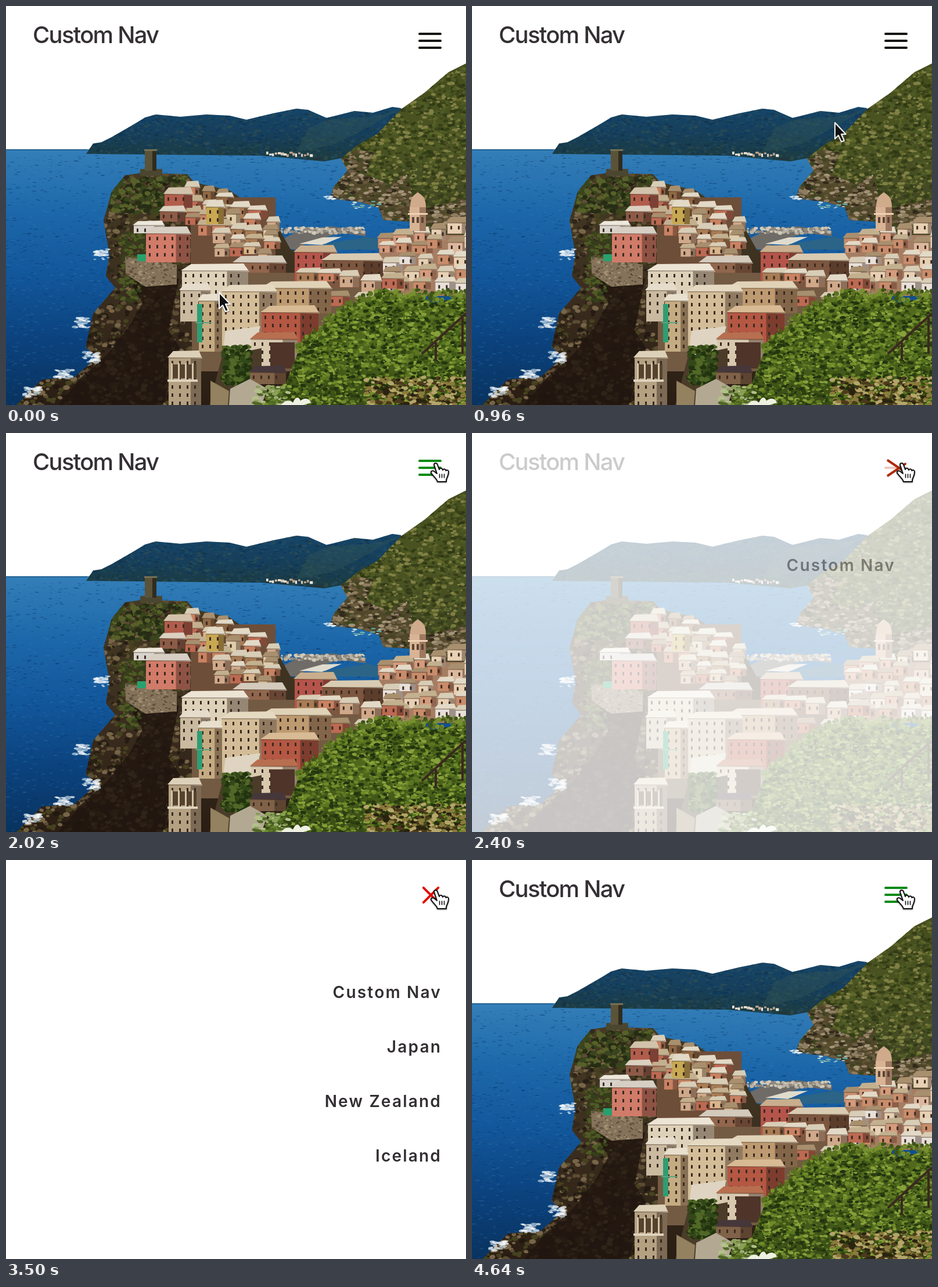
Write an HTML page with a canvas that moves like this. It is 792 px wide and 688 px high and loops after 4.66 s.

```html
<!DOCTYPE html>
<html lang="en">
<head>
<meta charset="utf-8">
<title>Custom Nav</title>
<style>
:root { --loop: 4660ms linear infinite; }
html, body { margin: 0; width: 100%; height: 100%; overflow: hidden; background: #fff; }
body { position: relative; font-family: Inter, "Open Sans", sans-serif; color: #332f33; }
canvas, .menu { position: absolute; left: 0; top: 0; width: 792px; height: 688px; }
h1 { position: absolute; left: 46px; top: 26px; margin: 0; font-size: 40px; line-height: 48px; font-weight: 500; letter-spacing: -1.75px; white-space: nowrap; }

.menu { background: #fff; animation: menu var(--loop); }
.menu span { position: absolute; right: 42px; top: calc(208px + var(--i) * 94px); font-size: 28px; line-height: 40px; font-weight: 600; letter-spacing: 2.2px; white-space: nowrap; animation: slide var(--loop) backwards; animation-delay: calc(var(--i) * 200ms); }
@keyframes menu {
  0%, 48.28% { opacity: 0; }
  52.58%, 81.33% { opacity: 1; }
  85.19%, 100% { opacity: 0; }
}
@keyframes slide {
  0%, 48.28% { opacity: 0; transform: translateX(-50px); animation-timing-function: ease; }
  57.94%, 85.84% { opacity: 1; transform: none; }
  85.85%, 100% { opacity: 0; transform: translateX(-50px); }
}

.bar { position: absolute; left: 710px; width: 40px; height: 4px; border-radius: 2px; animation: tint var(--loop), top var(--loop); }
.bar:nth-child(1) { top: 46px; }
.bar:nth-child(2) { top: 58px; animation-name: tint, middle; }
.bar:nth-child(3) { top: 70px; animation-name: tint, bottom; }
@keyframes tint {
  0%, 25.75% { background: #15140c; }
  28%, 48.28% { background: #088a14; }
  52.58%, 81.33% { background: #e10c00; }
  85.19%, 100% { background: #088a14; }
}
@keyframes top {
  0%, 48.28%, 85.19%, 100% { transform: none; }
  52.58%, 81.33% { transform: translate(1.5px, 12.5px) rotate(45deg); }
}
@keyframes middle {
  0%, 48.28%, 85.19%, 100% { opacity: 1; }
  52.58%, 81.33% { opacity: 0; }
}
@keyframes bottom {
  0%, 48.28%, 85.19%, 100% { transform: none; }
  52.58%, 81.33% { transform: translate(1.5px, -11.5px) rotate(-45deg); }
}

.cursor { position: absolute; left: 0; top: 0; width: 1px; height: 1px; overflow: visible; filter: drop-shadow(0 1px 1px #0007); animation: move var(--loop); }
.arrow { animation: arrow var(--loop); }
.hand { animation: hand var(--loop); }
@keyframes move {
  0%, 6.44% { transform: translate(366px, 493px); animation-timing-function: ease-in; }
  12.88% { transform: translate(384px, 483px); animation-timing-function: cubic-bezier(.45, 0, .25, 1); }
  28.33% { transform: translate(712px, 96px); animation-timing-function: ease-in-out; }
  42%, 100% { transform: translate(740px, 54px); }
}
@keyframes arrow { 0%, 25.74% { opacity: 1; } 25.75%, 100% { opacity: 0; } }
@keyframes hand { 0%, 25.74% { opacity: 0; } 25.75%, 100% { opacity: 1; } }
</style>
</head>
<body>
<canvas width="792" height="688"></canvas>
<h1>Custom Nav</h1>
<nav class="menu">
  <span style="--i:0">Custom Nav</span>
  <span style="--i:1">Japan</span>
  <span style="--i:2">New Zealand</span>
  <span style="--i:3">Iceland</span>
</nav>
<div><i class="bar"></i><i class="bar"></i><i class="bar"></i></div>
<svg class="cursor" stroke-linejoin="round" stroke-linecap="round">
  <path class="arrow" d="M1 1V29L7 23 12 34 17 32 12 21H20Z" fill="#111" stroke="#fff" stroke-width="2"/>
  <g class="hand" stroke="#111" stroke-width="2">
    <path d="M-3 1C-3-3 2-3 3 1L6 9C7 6 11 6 12 10 13 7 17 8 17.5 11 19 9 22 10 22 13 22 20 19 22 18 27V30H3C2 25-4 21-8 15-9 12-6 10-3 12L2 16Z" fill="#fff"/>
    <path d="M6.5 17V23M10.5 17V23M14.5 17V23" stroke-width="1.6"/>
  </g>
</svg>
<script>
const g = document.querySelector('canvas').getContext('2d');

let seed = 7;
const rnd = () => (seed = (seed * 16807) % 2147483647) / 2147483647;
const pick = list => list[Math.floor(rnd() * list.length)];
const range = (a, b) => a + rnd() * (b - a);

function shape(d, color) {
  g.fillStyle = color;
  g.fill(new Path2D(d));
}
function rect(x, y, w, h, color) {
  g.fillStyle = color;
  g.fillRect(x, y, w, h);
}
function fade(y0, y1, ...colors) {
  const f = g.createLinearGradient(0, y0, 0, y1);
  colors.forEach((c, i) => f.addColorStop(i / (colors.length - 1), c));
  return f;
}
// Scatter small dabs inside a path; box is [x, y, w, h].
function speckle(d, box, n, size, flat, colors) {
  const [x, y, w, h] = box;
  g.save();
  g.clip(new Path2D(d));
  for (let i = 0; i < n; i++) {
    const s = range(.4, 1) * size;
    g.fillStyle = pick(colors);
    g.beginPath();
    g.ellipse(x + rnd() * w, y + rnd() * h, s, s * flat, range(-.4, .4) * flat, 0, 7);
    g.fill();
  }
  g.restore();
}
function house(x, y, w, h, wall, roof = pick(['#d8cdb6', '#c3b08f', '#e2d9c6', '#a88f6e'])) {
  const r = Math.min(12, h * .35), tilt = w * .14;
  rect(x, y + r, w, h - r, wall);
  rect(x + w * .68, y + r, w * .32, h - r, '#2b180f66');
  shape(`M${x - 2} ${y + r}L${x + tilt} ${y + 1}L${x + w - tilt / 2} ${y}L${x + w + 2} ${y + r + 2}Z`, roof);
  rect(x - 1, y + r, w + 2, 1.5, '#4a33247a');
  for (let v = y + r + 6; v < y + h - 7; v += 14)
    for (let u = x + 5; u < x + w - 5; u += 13) rect(u, v, 3, 6, '#3b2a22');
}
// Fill a sloped strip with small houses, back row first.
function village(x0, x1, top, bottom, rows, w, walls) {
  for (let r = 0; r < rows; r++) {
    const k = rows > 1 ? r / (rows - 1) : 0;
    for (let x = x0 + rnd() * 12; x < x1; x += range(.75, 1.15) * w) {
      const t = (x - x0) / (x1 - x0);
      house(x, top(t) * (1 - k) + bottom(t) * k + range(-5, 5), range(.7, 1.1) * w, range(20, 32), pick(walls));
    }
  }
}

const sea = 'M0 247H792V688H0Z';
const far = 'M138 255L150 237 164 235 182 226 215 207 240 192 258 187 300 191 345 187 385 189 414 196 460 185 500 177 520 179 552 193 600 181 632 184 665 174 680 176 690 210 600 258 548 268 440 258Z';
const hill = 'M792 99L762 114 720 150 680 178 640 220 605 240 577 263 588 284 564 312 570 328 610 338 642 348 650 369 700 372V400H792Z';
const rocks = 'M577 263L605 248 632 252 620 290 660 308 690 290 700 330 720 350 792 330V400H700V372L650 369 642 348 610 338 557 332 564 312 588 284Z';
const cliff = 'M205 292L232 288 312 290 324 304 385 318 465 374 490 420 640 450 640 688H18L62 644 118 640 156 606 137 588 150 530 188 486 172 466 178 428 168 370 182 320Z';
const shade = 'M205 455L298 470 280 560 300 590 270 688H90L130 640 175 600 215 548 235 512Z';
const bush = 'M440 688L456 664 482 650 500 604 512 578 546 552 570 530 598 512 626 504 652 486 680 500 704 494 735 512 766 506 792 496V688Z';

const walls = ['#c98262', '#d9b58c', '#a97c55', '#bd6a52', '#e0cda8', '#8f6844', '#cfa98a'];

// Water and distant coast
shape(sea, fade(247, 688, '#347fb8', '#1c67a9', '#12569a', '#0b427d', '#09335f'));
speckle(sea, [0, 258, 792, 430], 4200, 4, .2, ['#0b3c7a88', '#3c82b866', '#08305f77', '#1f6bab88']);
rect(0, 247, 140, 1.5, '#195685');
shape(far, fade(176, 262, '#164568', '#163f5b', '#1c3c42'));
speckle(far, [138, 176, 552, 90], 1300, 4, .5, ['#0d365e88', '#38524d77', '#23506a88', '#122c3c66']);
shape('M520 212L552 196 635 190 678 178 600 222 560 240 500 252Z', '#34555566');
for (let x = 448; x < 528; x += 5) rect(x, range(251, 256), range(3, 6), range(3, 6), pick(['#d8c6b0', '#bfa38c', '#ece3d6']));
rect(530, 262, 14, 3, '#26323a');

// Right hillside
shape(hill, fade(100, 370, '#454d1d', '#4b5422', '#3f4323'));
speckle(hill, [560, 100, 232, 290], 2400, 5, .6, ['#28321299', '#6b702fa0', '#303a16aa', '#808045', '#4d5a25']);
shape(rocks, '#57482fbb');
speckle(rocks, [555, 248, 237, 140], 900, 6, .5, ['#8f7d62', '#332a1d', '#6b5c43', '#a39377', '#3e4520']);
speckle('M540 320H690V372H540Z', [545, 328, 20, 7], 12, 5, .3, ['#dbe7ee']);
speckle(sea, [596, 337, 48, 12], 18, 5, .3, ['#5fa39b', '#c9dde0']);

// Harbour
shape('M472 404L510 385 560 380 620 388 619 397 576 391 520 408 500 420 480 418Z', '#6f6c68');
speckle('M470 378H624V420H470Z', [472, 382, 145, 10], 120, 4, .7, ['#b9b2a4', '#d2cab9', '#8f887c']);
shape('M505 410L545 399 578 398 545 412Z', '#e0dccd');
shape('M545 411L622 398 640 402 640 420H548Z', '#2b6486');

// Promontory
shape(cliff, fade(290, 688, '#443a23', '#3b2e1f', '#2a1d13'));
speckle(cliff, [20, 290, 300, 398], 1900, 6, .7, ['#1c140eaa', '#5c4c33', '#776548', '#33291b', '#46411f']);
shape(shade, '#20150fd0');
speckle(cliff, [180, 296, 130, 60], 280, 6, .7, ['#39451d', '#58602a', '#252d14']);
speckle(cliff, [195, 390, 45, 120], 170, 5, .7, ['#4e5a24', '#343f1a']);
shape('M205 432L294 446 294 480 240 484 206 462Z', '#84725a');
speckle('M205 432L294 446 294 480 240 484 206 462Z', [205, 432, 90, 52], 150, 3, .6, ['#a39073', '#5e4f3c']);
for (const [x, y] of [[165, 428], [132, 546], [148, 606], [100, 635], [45, 665]])
  speckle(sea, [x - 14, y - 9, 28, 18], 26, 6, .4, ['#ffffffbb', '#c6d9e6aa']);

rect(231, 281, 38, 12, '#4b4630');
rect(239, 248, 19, 36, '#5b5338');
rect(252, 248, 7, 36, '#302c1e');
rect(238, 247, 22, 3, '#777052');

// Upper village
rect(318, 330, 146, 130, '#6d4e39');
village(300, 372, t => 304 + 14 * t, t => 360 + 10 * t, 4, 27, walls);
village(352, 460, t => 322 + 42 * t, t => 405 + 12 * t, 5, 30, walls);
house(273, 312, 48, 36, '#b25d4c', '#d3c2ab');
house(265, 344, 44, 28, '#8d5b48', '#dbd1c0');
house(345, 334, 30, 42, '#c8a851');
house(220, 370, 52, 22, '#d8d4cd', '#eee8dc');
house(241, 380, 76, 62, '#d17b69', '#d7cfc4');
rect(226, 428, 15, 12, '#28a06e');
house(392, 430, 90, 47, '#91664d', '#d3cabc');

// Right-hand town
rect(642, 395, 150, 105, '#a47d63');
village(640, 790, t => 388 - 26 * t, t => 468 + 4 * t, 5, 34, ['#e7d0b3', '#d59b7c', '#e8e0d9', '#c98c6b', '#dcb79d']);
rect(695, 346, 28, 42, '#d8b394');
rect(712, 346, 11, 42, '#9e7960');
rect(692, 357, 34, 3, '#eed2b5');
shape('M696 347C696 328 703 326 709 321 715 326 723 328 723 347Z', '#cfaa8b');
for (const x of [699, 707, 715]) rect(x, 364, 4, 10, '#5b4334');

// Near town
rect(320, 460, 330, 170, '#735a43');
house(497, 412, 72, 62, '#b5544a', '#c9ae8d');
house(545, 426, 104, 60, '#7c563f', '#d9cbb2');
village(500, 650, t => 448 + 16 * t, t => 480 + 18 * t, 2, 46, walls);
house(303, 444, 114, 58, '#ddd2b9', '#ece4d4');
house(300, 478, 52, 66, '#c9baa0', '#e6dccb');
house(440, 474, 120, 56, '#bd9a70', '#e0d2b6');
house(372, 480, 94, 106, '#d3bd98', '#e5d9c2');
house(332, 496, 40, 100, '#c5ab82', '#e8dfcd');
rect(329, 514, 9, 66, '#2f9d72');
rect(326, 545, 28, 2, '#5da583');
house(440, 516, 98, 70, '#b45743', '#d8bb94');
shape('M378 560L438 552 424 600 372 604Z', '#ded4c1');
house(422, 562, 80, 62, '#d8c8ae', '#b76f50');
rect(455, 580, 42, 45, '#4f3529');
shape('M372 604L440 590 440 688H350Z', '#4a3c29');
speckle('M360 580H440V688H360Z', [374, 586, 46, 66], 260, 6, .8, ['#33481a', '#22330f', '#516827']);
house(420, 620, 62, 32, '#7f6248', '#45373a');
house(280, 594, 56, 100, '#b4a182', '#ddd0b8');
rect(284, 618, 44, 24, '#55432f');
for (let x = 284; x < 328; x += 12) rect(x, 616, 3, 30, '#d4c4a7');
rect(278, 644, 52, 4, '#dfd3bd');
shape('M352 646L384 664 382 688H352Z', '#93815f');
shape('M386 660L420 643 450 660 440 688H384Z', '#b3a993');

// Foreground greenery
shape(bush, fade(488, 688, '#546b1d', '#4d651c', '#394a17'));
speckle(bush, [440, 486, 352, 202], 3600, 5, .6, ['#2c3f10', '#6f8a29', '#87a03a', '#3d5516', '#5a7621', '#223310']);
speckle(bush, [620, 640, 172, 48], 320, 6, .6, ['#4b3a1c', '#8a7a3c', '#b5a56a', '#2a2310']);
for (let i = 0; i < 300; i++) {
  const t = rnd();
  g.fillStyle = pick(['#5b7422', '#77902e', '#3d5417']);
  g.beginPath();
  g.arc(500 + 292 * t, 590 - 96 * Math.sin(Math.min(1, t * 1.9) * 1.57) + range(-5, 14), range(1, 4), 0, 7);
  g.fill();
}
g.strokeStyle = '#3c2820';
g.lineWidth = 4;
g.stroke(new Path2D('M716 600L792 530M740 580V612M786 536V600'));
speckle('M420 640H530V688H420Z', [428, 655, 60, 33], 60, 6, .5, ['#8ba05a', '#b4c08a', '#516827']);
shape('M474 688C480 680 488 678 494 684 498 674 504 672 507 681 514 674 523 677 525 684L512 688Z', '#eef0e2');
</script>
</body>
</html>
```
